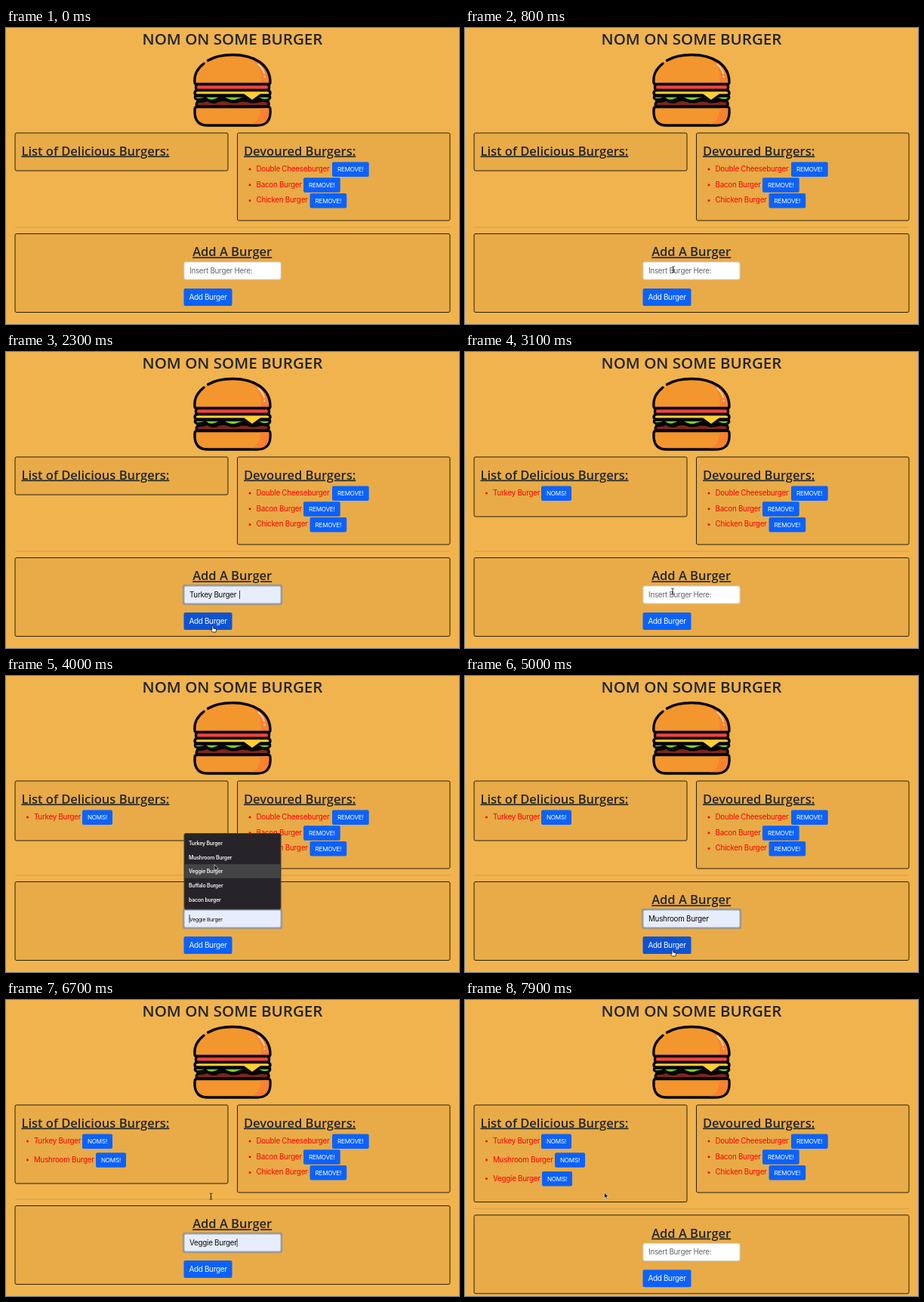
Recreate the animation shown at these times as an HTML page. Size 600 by 392 pixels, loop 8 s.

```html
<!DOCTYPE html>
<html lang="en">
<head>
<meta charset="utf-8">
<title>Nom on some burger</title>
<style>
  html, body { margin: 0; width: 100%; height: 100%; overflow: hidden; background: #f0b34e; }
  svg { display: block; width: 600px; height: 392px; }
  text { font: 9.8px Inter, "Liberation Sans", sans-serif; letter-spacing: -.025em; white-space: pre; }
  .title, .heading { font-family: "Open Sans", sans-serif; font-weight: 600; letter-spacing: 0; fill: #212529; }
  .title { font-size: 20.56px; }
  .heading { font-size: 16.5px; text-decoration: underline; }
  .mid { text-anchor: middle; }
  .item { fill: #f00; }
  .btn { fill: #fff; }
  .small { font-size: 8.1px; }
  .option { font-size: 6.9px; font-weight: 600; fill: #f2f2f2; }
  .preview { font-size: 6.8px; }
  .card { fill: #e8ab47; stroke: #2b220f; }
</style>
</head>
<body>
<svg viewBox="0 0 600 392">
  <rect width="600" height="392" fill="#f0b34e"/>
  <text class="title mid" x="300" y="21.5">NOM ON SOME BURGER</text>
  <g id="burger" stroke="#050505" stroke-width="3.4" stroke-linejoin="round" stroke-linecap="round">
    <path stroke="none" fill="#f3962d" d="M250 74C249 50 268 36 300 36S351 50 350 74Z"/>
    <path stroke="none" fill="#f9812f" d="M318 37C341 42 351 54 350 74H337C340 56 333 44 318 37Z"/>
    <path fill="none" d="M262 47C253 54 249 63 250 72Q250 74.5 253 74.5H347Q350 74.5 350 72C350 48 328 35.500 300 35.500C287 35.500 276 38 267.500 43"/>
    <rect x="251.500" y="74.500" width="97" height="8" rx="3" fill="#f04440"/>
    <path fill="#79d32c" d="M251 90Q249 94 254 95Q260 95 264 93Q270 99 278 95Q286 91 293 95Q301 99 308 95Q316 92 322 95Q330 98 336 94Q342 97 347 95Q351 93 349 90Z"/>
    <path fill="#7d261d" d="M254 97Q262 98 266 95Q274 101 282 96Q290 94 296 97Q304 99 311 96Q318 95 325 98Q333 98 339 96L347 97Q350 103 345 104H255Q250 103 254 97Z"/>
    <path fill="#fdcf34" d="M254 82.500H346Q350 83 350 86T346 89H337L326 97L315 89H254Q250 89 250 86T254 82.500Z"/>
    <path fill="#f3962d" d="M253 104.500H347Q350 104.500 350 108V113Q349 129 333 129H267Q251 129 250 113V108Q250 104.500 253 104.500Z"/>
    <path stroke="none" fill="#f9812f" d="M337 106.200H348.300V113Q347 127 333 127.300H324Q337 124 337 106.200Z"/>
    <path fill="none" stroke="#fbd7a0" stroke-width="2" d="M334 48Q340 53 342 60M342.500 64V65"/>
  </g>
  <g id="devoured"></g>
  <g id="scene"></g>
</svg>
<script>
const LOOP = 8000;
const OPTIONS = ['Turkey Burger', 'Mushroom Burger', 'Veggie Burger', 'Buffalo Burger', 'bacon burger'];
const ROW_TOP = 212, ROW_HEIGHT = 18.6;

const rounds = [
  { open: 1000, pick: 1850, submit: 2450, name: OPTIONS[0], buttonX: 101 },
  { open: 3450, pick: 4400, submit: 5150, name: OPTIONS[1], buttonX: 119 },
  { open: 5900, pick: 6600, submit: 7400, name: OPTIONS[2], buttonX: 102 },
];

// Pointer stops: time, x, y
const path = [
  [150, 330, 400], [700, 276, 320], [1150, 276, 318], [1600, 276, 234], [1730, 275, 222],
  [1870, 275, 222], [2250, 274, 363], [2600, 274, 363], [3000, 275, 317], [3550, 275, 317],
  [4000, 276, 249.8], [4200, 276, 240], [4430, 276, 240], [4850, 275, 363], [5300, 275, 363],
  [5700, 275, 320], [5980, 275, 320], [6350, 271.5, 260], [6720, 271.5, 260], [7150, 272, 363],
  [7500, 272, 363], [7900, 184.5, 255],
];

const text = (x, y, cls, str, extra = '') => `<text x="${x}" y="${y}" class="${cls}" ${extra}>${str}</text>`;
const box = (x, y, w, h, attrs) => `<rect x="${x}" y="${y}" width="${w}" height="${h}" rx="2" ${attrs}/>`;
const card = (x, y, w, h) => box(x, y, w, h, 'class="card"');

function listItem(x, y, name, buttonX, label, width) {
  return `<circle cx="${x - 8.5}" cy="${y + 9.5}" r="1.5" fill="#f00"/>` +
    text(x, y + 12.5, 'item', name) +
    box(buttonX, y, width, 19.5, 'fill="#0b62fb"') +
    text(buttonX + width / 2, y + 12.8, 'btn small mid', label);
}

function pointerAt(t) {
  const next = path.findIndex(stop => stop[0] > t);
  if (next === 0) return path[0].slice(1);
  if (next < 0) return path[path.length - 1].slice(1);
  const [t0, x0, y0] = path[next - 1], [t1, x1, y1] = path[next];
  const p = (t - t0) / (t1 - t0), e = p * p * (3 - 2 * p);
  return [x0 + (x1 - x0) * e, y0 + (y1 - y0) * e];
}

const pointers = {
  arrow: '<path d="M0 0V7.600L1.800 6L3 8.700L4.200 8.200L3 5.600H5.400Z" fill="#050505" stroke="#fff" stroke-width=".6"/>',
  beam: '<path d="M-1.800 -4Q0 -4 0 -3Q0 -4 1.800 -4M0 -3V3M-1.800 4Q0 4 0 3Q0 4 1.800 4M-1 1H1" fill="none" stroke="#222" stroke-width=".9"/>',
  hand: '<path d="M-1 0Q0 -1 .8 0V3L4 3.700Q4.800 4 4.600 5L4 8H-.5L-3 4.700Q-2.600 3.500 -1 5Z" fill="#fff" stroke="#111" stroke-width=".8" stroke-linejoin="round"/>',
};

function delicious(eaten) {
  const height = [50, 79, 104, 128.5][eaten.length];
  return card(12, 139, 282, height) +
    text(20.5, 168.5, 'heading', 'List of Delicious Burgers:') +
    eaten.map((r, i) => listItem(37, 177.5 + i * 24.75, r.name, r.buttonX, 'NOMS!', 40)).join('');
}

function field(value, focused, preview, caretX) {
  const ring = focused ? box(235, 309, 130, 25, 'fill="none" stroke="#0d6efd" stroke-opacity=".32" stroke-width="2.4"') : '';
  const fill = value ? '#e8edfc' : '#fff';
  const border = focused ? '#8ea6cf' : '#ced4da';
  const label = value
    ? text(243, preview ? 325 : 325.2, preview ? 'preview' : '', value, 'fill="#0a0a0a"')
    : text(243, 325.2, '', 'Insert Burger Here:', 'fill="#60676e"');
  const caret = caretX ? `<path d="M${caretX} 316V327" stroke="#111" stroke-width=".8"/>` : '';
  return ring + box(236, 310, 128, 23, `fill="${fill}" stroke="${border}"`) + label + caret;
}

function dropdown(hover) {
  const rowY = i => ROW_TOP + i * ROW_HEIGHT;
  const highlight = hover < 0 ? '' :
    `<rect x="236.500" y="${rowY(hover)}" width="127" height="${ROW_HEIGHT}" fill="#444346"/>`;
  return box(236, 208.5, 128, 100.5, 'fill="#262428" stroke="#48443f"') + highlight +
    OPTIONS.map((name, i) => text(242, rowY(i) + 12.1, 'option', name)).join('');
}

const scene = document.getElementById('scene');
document.getElementById('devoured').innerHTML = card(306.5, 139, 281.5, 116) +
  text(315, 168.5, 'heading', 'Devoured Burgers:') +
  [['Double Cheeseburger', 432], ['Bacon Burger', 394], ['Chicken Burger', 402.5]]
    .map(([name, x], i) => listItem(331.5, 177.5 + i * 20.7, name, x, 'REMOVE!', 48.7)).join('');

function render(t) {
  const added = rounds.filter(r => t >= r.submit);
  const current = rounds.find(r => t >= r.open && t < r.submit);
  const open = current && t < current.pick;
  const [px, py] = pointerAt(t);
  const shift = added.length === 3 ? 12.3 : 0;

  const row = Math.floor((py - ROW_TOP) / ROW_HEIGHT);
  const hover = open && row >= 0 && row < OPTIONS.length ? row : -1;
  const value = open ? OPTIONS[hover] : current && current.name;
  const inX = px > 236 && px < 300;
  const onButton = inX && py > 345 + shift && py < 368 + shift;
  const onField = inX && py > 310 + shift && py < 333 + shift;
  const kind = open ? 'arrow' : onButton ? 'hand' : current || onField ? 'beam' : 'arrow';

  let caretX = 0;
  if (open) caretX = 243;
  else if (current && (t - current.pick) % 1000 < 500) caretX = [309.5, 323.5, 306][rounds.indexOf(current)];

  scene.innerHTML = delicious(added) +
    `<g transform="translate(0 ${shift})">
      <path d="M12 264H588" stroke="#d6a047"/>` +
      card(12, 272.5, 576, 104) +
      text(299.7, 302.3, 'heading mid', 'Add A Burger') +
      field(value, !!current, open, caretX) +
      box(235.5, 345, 64, 23, `fill="${onButton ? '#0e53d4' : '#0b62fb'}"`) +
      text(267.5, 360.2, 'btn mid', 'Add Burger') +
    '</g>' +
    (open ? dropdown(hover) : '') +
    `<g transform="translate(${px} ${py})">${pointers[kind]}</g>`;
}

const start = performance.now();
function tick() {
  render((performance.now() - start) % LOOP);
  requestAnimationFrame(tick);
}
tick();
</script>
</body>
</html>
```
